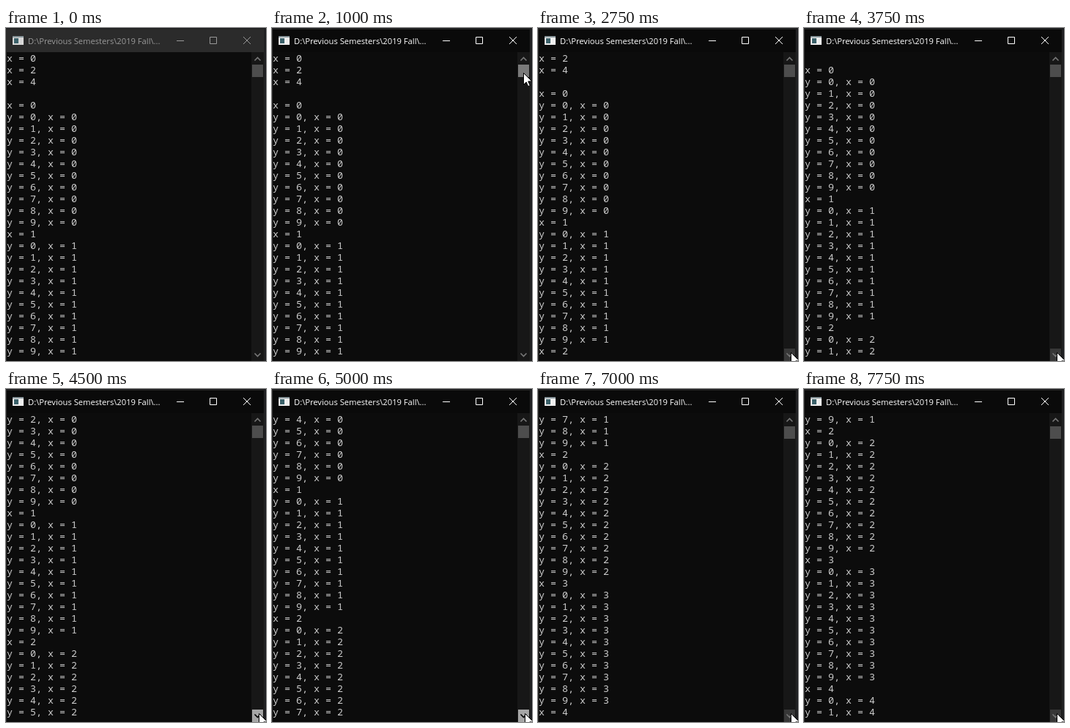
Recreate the animation shown at these times as an HTML page with a canvas. Size 355 by 455 pixels, loop 8 s.

```html
<!DOCTYPE html>
<html lang="en">
<head>
<meta charset="utf-8">
<title>Console scrolling</title>
<style>
  html, body { margin: 0; width: 100%; height: 100%; overflow: hidden; background: #0c0c0c; }
  canvas { display: block; }
</style>
</head>
<body>
<canvas width="355" height="455"></canvas>
<script>
const ctx = document.querySelector('canvas').getContext('2d');
const LOOP = 8000, STEP = 250, ROWS = 26, LINE_HEIGHT = 16;

const lines = ['x = 0', 'x = 2', 'x = 4', ''];
for (let x = 0; x < 5; x++) {
  lines.push(`x = ${x}`);
  for (let y = 0; y < 10; y++) lines.push(`y = ${y}, x = ${x}`);
}

// Linear move from one value to another between two times
const ramp = (t, start, end, from, to) =>
  from + (to - from) * Math.min(1, Math.max(0, (t - start) / (end - start)));

// Slow clicks, faster clicks, a held button, then slow clicks again
const topLine = t => Math.round(
  ramp(t, 2500, 3750, 0, 3) + ramp(t, 3750, 5000, 0, 6) +
  ramp(t, 5250, 6250, 0, 13) + ramp(t, 6750, 7750, 0, 3));

// Enters at the right edge, rests on the thumb, then moves to the down button
const cursorAt = t => ({
  x: ramp(t, 250, 1000, 353, 343) + ramp(t, 1250, 2500, 0, 2),
  y: ramp(t, 250, 1000, 110, 61) + ramp(t, 1250, 2500, 0, 382)
});

function rect(color, x, y, w, h) {
  ctx.fillStyle = color;
  ctx.fillRect(x, y, w, h);
}

function stroke(color, path, width = 1) {
  ctx.strokeStyle = color;
  ctx.lineWidth = width;
  ctx.stroke(new Path2D(path));
}

function text(str, x, y, font, color) {
  ctx.font = font;
  ctx.fillStyle = color;
  ctx.fillText(str, x, y);
}

function drawTitleBar(active) {
  const ink = active ? '#fff' : '#999';
  rect(active ? '#0a0a0a' : '#2b2b2b', 1, 2, 351, 31);
  rect(active ? '#f0f0f0' : '#d8d8d8', 9, 11, 15, 12);
  rect('#8a979c', 9, 11, 15, 2);
  rect('#3c626b', 11, 14, 6, 7);
  text('D:\\Previous Semesters\\2019 Fall\\...', 30, 22, '11.2px "Open Sans", sans-serif', ink);
  stroke(ink, 'M233 17.5h10M278.5 12.5h9v9h-9z');
  stroke(ink, 'M324 12l10 10M334 12l-10 10');
}

function drawScrollBar(thumbY, thumbHover, buttonHover, pressed) {
  rect('#171717', 335, 33, 17, 422);
  rect(thumbHover ? '#7a7a7a' : '#4d4d4d', 336, thumbY, 15, 17);
  if (buttonHover) rect(pressed ? '#a6a6a6' : '#373737', 336, 438, 15, 17);
  stroke('#777', 'M339.5 44.5l4-4 4 4', 1.6);
  stroke(pressed ? '#000' : '#777', 'M339.5 444.5l4 4 4-4', 1.6);
}

function drawCursor({ x, y }) {
  const arrow = new Path2D('M.5.5v16l3.7-3.6 2.5 5.8 2.6-1.1-2.5-5.7h5.1z');
  ctx.save();
  ctx.translate(Math.round(x), Math.round(y));
  ctx.fillStyle = '#fff';
  ctx.fill(arrow);
  ctx.strokeStyle = '#000';
  ctx.lineWidth = 1;
  ctx.stroke(arrow);
  ctx.restore();
}

function draw(now) {
  const t = Math.floor(now % LOOP / STEP) * STEP;
  const top = topLine(t);
  const thumbY = 50 + Math.round(top / 30);
  const cursor = cursorAt(t);
  const held = t >= 4500 && t < 6250;
  const over = y => cursor.x < 351 && cursor.y >= y && cursor.y < y + 17;

  rect('#1c1d20', 0, 0, 355, 455);
  rect('#262626', 0, 1, 353, 454);
  rect('#0c0c0c', 1, 33, 351, 422);
  drawTitleBar(t >= 500);
  lines.slice(top, top + ROWS).forEach((line, row) =>
    text(line, 1, 46 + LINE_HEIGHT * row, '13.333px "Noto Sans Mono", monospace', '#ccc'));
  drawScrollBar(thumbY, over(thumbY), over(438), held);
  if (t > 0) drawCursor(cursor);
  requestAnimationFrame(draw);
}
requestAnimationFrame(draw);
</script>
</body>
</html>
```
